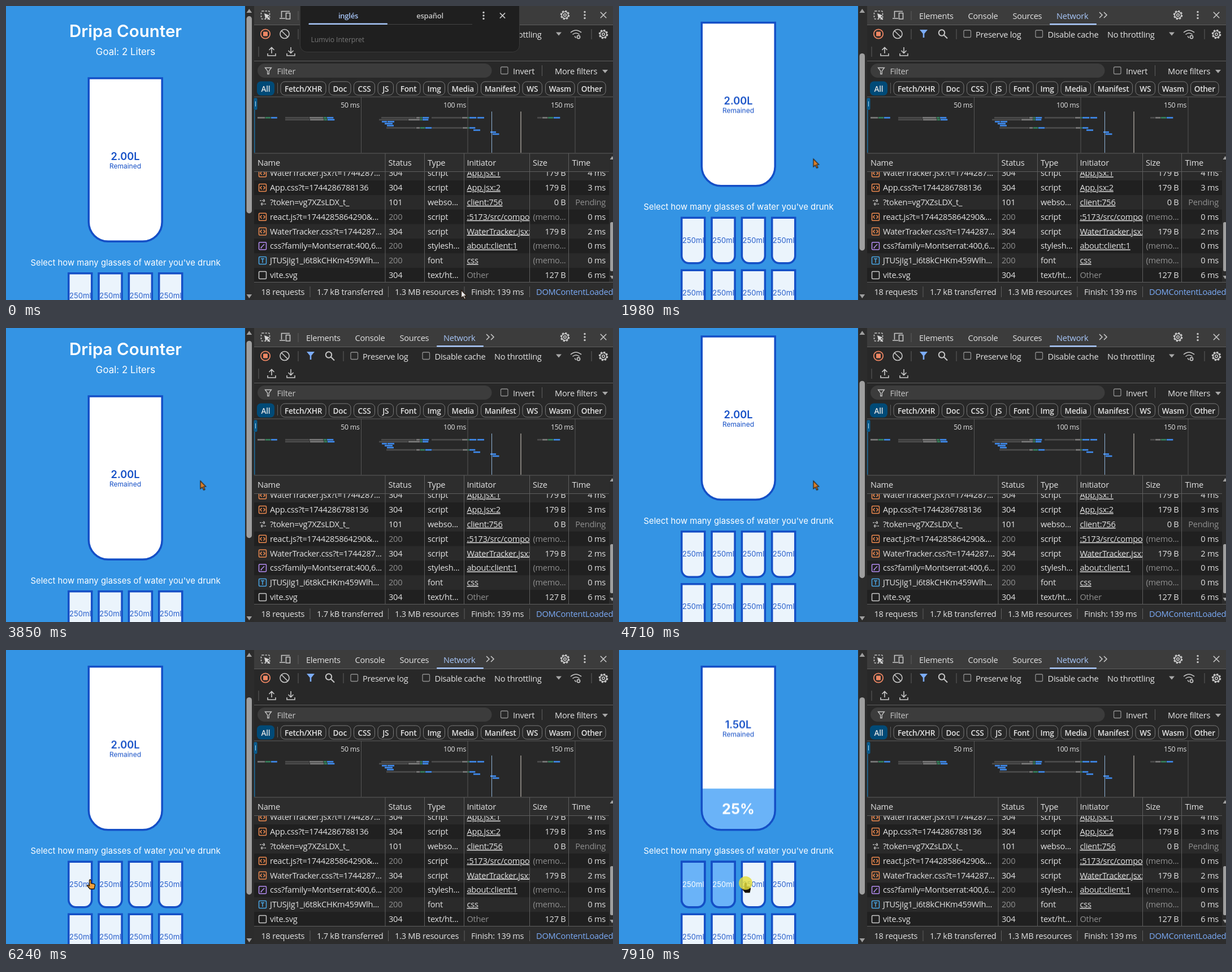
Animation, 1074 px wide and 521 px high, one loop 8 s. Source, as an HTML page:

```html
<!DOCTYPE html>
<html lang="en">
<head>
<meta charset="utf-8">
<title>Hydration page</title>
<style>
@property --scroll { syntax: "<number>"; inherits: true; initial-value: 0; }
@property --level { syntax: "<number>"; inherits: true; initial-value: 0; }
html, body { margin: 0; width: 100%; height: 100%; overflow: hidden; background: #282828; }
svg { display: block; width: 1074px; height: 521px;
  animation: scroll 8s step-end infinite, level 8s linear infinite; }
text { font: 14.6px "Open Sans", "Noto Sans", sans-serif; letter-spacing: -.25px; fill: #e3e3e3; white-space: pre; }
.app text { font-family: Inter, sans-serif; letter-spacing: 0; text-anchor: middle; fill: #fff; }
.app .ink { fill: #144fc6; }
.app .soft { fill: #2a61cc; }
.dim { fill: #8f8f8f; }
.link { text-decoration: underline; }
.blue { fill: #a8c7fa; }
.end { text-anchor: end; }
.mid { text-anchor: middle; }
.line { fill: none; stroke: #c7c7c7; stroke-width: 1.6; }
.glass { stroke: #144fc6; stroke-width: 3.5; }

.page { transform: translateY(calc(var(--scroll) * -1px)); }
.thumb { transform: translateY(calc(var(--scroll) * .67px)); }
.liquid { transform: translateY(calc(var(--level) * -2.86px)); }
.half { transform: translateY(calc(var(--level) * -1.43px)); }
.p0, .p1, .p2, .hover, .click, .arrow, .hand { animation: p0 8s step-end infinite; }
.p1 { animation-name: p1; }
.p2 { animation-name: p2; }
.hover { animation-name: hover; }
.click { animation-name: click; }
.arrow { animation-name: arrow; }
.hand { animation-name: hand; }
.full0 { animation: full0 8s linear infinite; }
.full1 { animation: full1 8s linear infinite; }
.popup { animation: popup 8s linear infinite; }
.pointer { animation: pointer 8s linear infinite; }

@keyframes scroll {
  0%, 35.45%, 66.2% { --scroll: 0; }
  22.2%, 48.1%, 69.45% { --scroll: 7; }
  23.05%, 48.9%, 70.25% { --scroll: 44; }
  23.85%, 49.7%, 71.1% { --scroll: 87; }
  24.7%, 50.55%, 71.9%, 100% { --scroll: 98.5; }
  33.8% { --scroll: 65; }
  34.6% { --scroll: 12; }
  58.8% { --scroll: 113; }
  59.6% { --scroll: 150; }
  60.4% { --scroll: 187; }
  61.2% { --scroll: 197; }
  62.1% { --scroll: 165; }
  62.9% { --scroll: 112; }
  63.7% { --scroll: 78; }
  64.5% { --scroll: 40; }
  65.3% { --scroll: 10; }
}
@keyframes level {
  0%, 80.4% { --level: 0; animation-timing-function: ease; }
  84.2% { --level: 12.5; }
  90.55% { --level: 12.5; animation-timing-function: ease; }
  94.3%, 100% { --level: 25; }
}
@keyframes p0 { 0% { opacity: 1; } 80.4%, 100% { opacity: 0; } }
@keyframes p1 { 0%, 90.55%, 100% { opacity: 0; } 80.4% { opacity: 1; } }
@keyframes p2 { 0% { opacity: 0; } 90.55%, 100% { opacity: 1; } }
@keyframes full0 { 0%, 80.4% { opacity: 0; } 84.2%, 100% { opacity: 1; } }
@keyframes full1 { 0%, 90.55% { opacity: 0; } 94.3%, 100% { opacity: 1; } }
@keyframes popup { 0%, 7.4% { opacity: 1; } 10%, 100% { opacity: 0; } }
@keyframes hover {
  0%, 2.45%, 100% { opacity: 0; }
  .85% { opacity: 1; transform: translateY(103.2px); }
  1.65% { opacity: 1; transform: none; }
}
@keyframes click {
  0%, 9.1%, 83%, 93.1% { opacity: 0; }
  7.4%, 80.4%, 90.55%, 98.8%, 100% { opacity: .82; }
}
@keyframes arrow {
  0% { fill: #e6e6e6; opacity: 1; }
  2.8% { fill: #d9802c; opacity: 1; }
  77.5%, 100% { fill: #d9802c; opacity: 0; }
}
@keyframes hand {
  0% { fill: #f0a03c; opacity: 0; }
  77.5% { fill: #f0a03c; opacity: 1; }
  98.8%, 100% { fill: #141008; opacity: 1; }
}
@keyframes pointer {
  0%, .8% { transform: translate(805px, 503px); }
  1.7% { transform: translate(640px, 380px); }
  2.5% { transform: translate(470px, 240px); }
  3.3% { transform: translate(335px, 222px); }
  4.1%, 8.8% { transform: translate(258px, 303px); }
  14%, 72% { transform: translate(343.5px, 270.5px); }
  75% { transform: translate(268px, 306px); }
  77.9%, 84.75% { transform: translate(149px, 407px); }
  89.7%, 92.5% { transform: translate(188px, 412px); }
  95.6%, 100% { transform: translate(224px, 413px); }
}
</style>
</head>
<body>
<script>
const text = (x, y, s, cls = "", style = "") =>
  `<text x="${x}" y="${y}" class="${cls}" style="${style}">${s}</text>`;
const box = (x, y, w, h, fill, r = 0, more = "") =>
  `<rect x="${x}" y="${y}" width="${w}" height="${h}" rx="${r}" fill="${fill}" ${more}/>`;
const path = (d, more = 'class="line"') => `<path d="${d}" ${more}/>`;
const solid = (d, fill = "#c7c7c7") => path(d, `fill="${fill}"`);
const vline = (x, y, h, c = "#5e5e5e") => box(x - .5, y, 1, h, c);
const hline = (y) => box(439, y, 635, 1, "#5e5e5e");
const list = (items, fn) => items.map(fn).join("");

// ---- water page ----
const cupPath = (x, y, w, h, r) =>
  `M${x} ${y}h${w}v${h - r}a${r} ${r} 0 0 1 ${-r} ${r}h${2 * r - w}a${r} ${r} 0 0 1 ${-r} ${-r}z`;

function cup(i) {
  const x = 110.8 + (i % 4) * 53.3, y = 473.8 + (i >> 2) * 93;
  const d = cupPath(x, y, 41, 80.4, 13);
  const label = (cls) => text(x + 20.5, y + 44.2, "250ml", cls, "font-size:13.1px");
  const full = i < 2 ? `<g class="full${i}">${path(d, 'class="glass" fill="#6ab3f8"')}${label("")}</g>` : "";
  return path(d, 'class="glass" fill="#ebf4fc"') + label("soft") + full;
}

const big = cupPath(146.3, 127.9, 129.9, 289.4, 34.5);
const page = `<g class="page">
  ${text(211.5, 54.5, "Dripa Counter", "", "font-size:29.5px;font-weight:600")}
  ${text(211.5, 87, "Goal: 2 Liters", "", "font-size:16.9px")}
  ${path(big, 'fill="#fff"')}
  <g clip-path="url(#inner)">
    <g class="liquid">${box(146, 415.6, 131, 80, "#6ab3f8")}</g>
    <g class="half">
      ${list(["2.00L", "1.75L", "1.50L"], (s, i) =>
        text(211, 272.5, s, "ink p" + i, "font-size:18.2px;font-weight:600"))}
      ${text(211, 287.5, "Remained", "ink", "font-size:12px")}
      ${list(["", "12.5%", "25%"], (s, i) =>
        text(211, 425, s, "p" + i, "font-size:25.5px;font-weight:700"))}
    </g>
  </g>
  ${path(big, 'class="glass" fill="none"')}
  ${text(211.5, 459.5, "Select how many glasses of water you've drunk", "", "font-size:14.9px")}
  ${list([...Array(8).keys()], cup)}
</g>`;

const pageBar = box(423, 0, 16, 521, "#2c2c2c")
  + solid("M425.5 12l4.8-7 4.8 7z", "#9f9f9f") + solid("M425.5 511l4.8 7 4.8-7z", "#9f9f9f")
  + `<g class="thumb">${box(425.5, 18, 9.5, 349.5, "#9f9f9f", 4.7)}</g>`;

// ---- icons ----
const at = (x, y, s) => `<g transform="translate(${x} ${y})">${s}</g>`;
const gear = (x, y) => at(x, y, `<circle r="6.8" class="line" stroke-dasharray="3.1 2.24" style="stroke-width:3"/>
  <circle r="5.8" class="line"/><circle r="2.3" class="line"/>`);
const dots = (x, y) => list([-5.5, 0, 5.5], (d) => `<circle cx="${x}" cy="${y + d}" r="1.7" fill="#c7c7c7"/>`);
const cross = (x, y, r) => path(`M${x - r} ${y - r}l${2 * r} ${2 * r}m0 ${-2 * r}l${-2 * r} ${2 * r}`);
const check = (x, y) => box(x, y, 12.5, 12.5, "none", 2, 'stroke="#8f8f8f" stroke-width="1.3"');
const caret = (x, y) => solid(`M${x - 5} ${y - 3}h10l-5 6z`, "#a8a8a8");
const funnel = (x, y, k, attrs) =>
  path(`M${x - k} ${y - k}h${2 * k}l${1.3 - k} ${k}v${k}h-2.6v${-k}z`, attrs);

// ---- developer panel ----
const toolbars = box(439, 0, 635, 521, "#282828") + box(439, 0, 635, 33, "#3c3c3c") + hline(33)
  + box(451.5, 9, 15, 14, "none", 2, 'class="line" stroke-dasharray="3 2.2"')
  + solid("M457 13l10 4-4 1.6 4.5 4.6-1.6 1.6-4.6-4.6-1.8 4z", "#d8d8d8")
  + path("M502 9.5h-14.5v11M484 22h10M495.5 12.5h7v10.5h-7z") + vline(517, 9, 16)
  + list([["Elements", 531], ["Console", 617.5], ["Sources", 696.5]], ([s, x]) => text(x, 23, s))
  + text(774, 23, "Network", "blue") + box(762, 31, 83, 2.5, "#a8c7fa", 1)
  + path("M850 11l5 5-5 5m8-10l5 5-5 5") + gear(989, 16) + dots(1024, 16) + cross(1057, 16, 5.2)
  + `<circle cx="459" cy="49.5" r="8.2" fill="none" stroke="#ec8663" stroke-width="1.8"/>`
  + box(455, 45.5, 8, 8, "#ec8663", 1)
  + `<circle cx="493" cy="49.5" r="8" class="line"/>` + path("M487.5 44l11 11") + vline(517, 41, 18)
  + funnel(539, 49, 7, 'fill="#7cacf8"')
  + `<circle cx="571" cy="47.5" r="5.2" class="line" style="stroke-width:2"/>`
  + path("M575 51.5l6 6", 'class="line" style="stroke-width:2"') + vline(597, 41, 18)
  + check(610, 43) + text(631, 55.5, "Preserve log") + check(737, 43) + text(758.5, 55.5, "Disable cache")
  + text(864, 55.5, "No throttling") + caret(978, 49.5)
  + path("M999 47q9.500-8 19 0M1002.500 50.500q6-5 12 0M1006 53.500l2.500 3")
  + at(1013, 55, `<circle r="2.600" class="line"/>`) + vline(1036, 41, 18) + gear(1057, 50)
  + vline(447, 72, 18)
  + path("M470 84v-10m-4.500 4l4.500-4.500 4.500 4.500M463 84v4h14v-4M504 73v10m-4.500-4l4.500 4.500 4.500-4.500M497 84v4h14v-4")
  + hline(97)
  + box(445, 102, 414.5, 25, "#3c3c3c", 12.5) + funnel(464, 115, 5.5, 'class="line" style="stroke-width:1.3"')
  + text(479.5, 120.5, "Filter", "", "fill:#c7c7c7") + check(875.5, 108) + text(897, 120.5, "Invert")
  + vline(948.5, 105, 19) + text(971, 120.5, "More filters") + caret(1060, 116);

const pills = { "Fetch/XHR": [486, 566], Doc: [571.5, 610], CSS: [615.5, 652.5], JS: [658, 685.5], Font: [691, 733],
  Img: [738.5, 776.5], Media: [782, 834.5], Manifest: [840.5, 908.5], WS: [914, 948.5], Wasm: [954.5, 1006], Other: [1011.5, 1061] };
const pillText = (x, s) => text(x, 151.5, s, "mid", "font-size:13.6px;font-weight:600");
const filters = box(444, 133.5, 31, 25, "#004a77", 7) + pillText(459.5, "All") + vline(480.5, 136, 19)
  + list(Object.entries(pills), ([s, [a, b]]) =>
    box(a, 134, b - a, 24, "none", 7.5, 'stroke="#7a7a7a"') + pillText((a + b) / 2, s));

// Each strip lists its edges: waiting, queued, server, download.
const shades = ["#4c4c4c", "#7d7d7d", "#35845c", "#3f8cf0"];
const strip = ([y, ...x]) => list(shades, (c, i) => box(x[i], y - 1.3, Math.max(0, x[i + 1] - x[i] - .7), 2.6, c));
const dash = ([y, x, w]) => box(x, y - 1.3, w, 2.6, shades[3]);
const overview = hline(160.5)
  + list([[628.5, "50 ms"], [817, "100 ms"], [1007, "150 ms"]], ([x, s]) =>
    vline(x, 161, 99, "#555") + text(x - 3, 179.5, s, "end", "font-size:12.3px"))
  + list([[198, 445, 445, 459, 469, 480.5], [198, 494, 537, 562, 568, 580], [198, 664, 726, 733, 737, 749],
    [198, 753, 807, 817, 820, 833], [198, 940, 949, 959, 969, 981], [201.5, 494, 538, 563, 569, 582],
    [201.5, 660, 712, 733, 737, 748], [216, 673, 726, 733, 742, 754], [216, 754, 808, 817, 820, 831]], strip)
  + list([[198, 834, 12], [205, 665, 9], [205, 675, 12], [208.5, 670, 14], [212, 674, 12], [220, 827, 12],
    [223.5, 857, 10], [227, 861, 11.500]], dash)
  + vline(859.5, 187, 73, "#8fb4d8") + vline(911, 187, 73, "#d8d0c8")
  + box(439, 184, 1.5, 76, "#1f6f9f") + box(438.500, 163, 6, 21, "#0b5b8c", 2) + vline(441.5, 169, 9, "#a8d4f0");

const glyphs = {
  code: ["#ee8a4f", "M452.500-3l-2.600 3 2.600 3m3-6l2.600 3-2.600 3"],
  style: ["#b48cf2", "M451 3l6-6M450.500 4l2-1"],
  font: ["#4aa8e8", "M451-3h6m-3 0v7"],
  page: ["#c7c7c7", ""],
};
const icon = (kind) => kind === "socket"
  ? path("M449-3h9m-2.500-2.500l2.500 2.500-2.500 2.500M460 3h-9m2.500-2.500l-2.500 2.500 2.500 2.500", 'class="line" stroke-dasharray="3 1" style="stroke-width:1.4"')
  : `<g fill="none" stroke="${glyphs[kind][0]}" stroke-width="1.5">${box(447.5, -6.5, 13, 13, "none", 1.5)}${path(glyphs[kind][1], "")}</g>`;

const rows = [
  ["code", "WaterTracker.jsx?t=1744287...", 304, "script", "App.jsx:1", "179 B", "4 ms"],
  ["code", "App.css?t=1744286788136", 304, "script", "App.jsx:2", "179 B", "3 ms"],
  ["socket", "?token=vg7XZsLDX_t_", 101, "webso...", "client:756", "0 B", "Pending"],
  ["code", "react.js?t=1744285864290&amp;...", 200, "script", ":5173/src/compo", "(memo...", "0 ms"],
  ["code", "WaterTracker.css?t=1744287...", 304, "script", "WaterTracker.jsx:2", "179 B", "2 ms"],
  ["style", "css?family=Montserrat:400,6...", 200, "stylesh...", "about:client:1", "(memo...", "0 ms"],
  ["font", "JTUSjIg1_i6t8kCHKm459Wlh...", 200, "font", "css", "(memo...", "0 ms"],
  ["page", "vite.svg", 304, "text/ht...", "Other", "127 B", "6 ms"],
];
const dimIf = (on) => on ? "dim" : "";
const row = ([kind, name, status, type, from, size, time], i) => at(0, 296.3 + i * 25.8,
  box(439, -12.9, 628, 25.8, i % 2 ? "#202020" : "#2a2a2a") + icon(kind)
  + text(467, 5, name) + text(677, 5, status, dimIf(status === 200)) + text(746, 5, type)
  + `<g clip-path="url(#from)">${text(815.5, 5, from, from === "Other" ? "dim" : "link")}</g>`
  + text(990.5, 5, size, "end " + dimIf(size[0] === "("))
  + text(1061, 5, time, "end " + dimIf(time === "Pending")));

const table = `<g clip-path="url(#body)">${list(rows, row)}
    <g class="hover">${box(439, 361, 628, 25.8, "#fff", 0, 'opacity=".1"')}</g></g>`
  + box(439, 261, 635, 32.500, "#2d2d2d") + hline(260.5) + hline(293)
  + list([["Name", 445], ["Status", 676.5], ["Type", 746], ["Initiator", 815.5], ["Size", 932], ["Time", 1001.500]],
    ([s, x]) => text(x, 283.3, s))
  + list([671, 740.5, 810.5, 926.5, 995.5], (x) => vline(x, 261, 228))
  + box(1067, 262, 7, 227, "#2c2c2c") + box(1069, 383, 6, 87, "#9f9f9f", 2.5)
  + solid("M1068.500 272l4-6 4 6z", "#9f9f9f") + solid("M1068.500 478l4 6 4-6z", "#9f9f9f")
  + box(439, 489, 635, 32, "#2d2d2d") + hline(489)
  + list([["18 requests", 451.5], ["1.7 kB transferred", 550], ["1.3 MB resources", 688], ["Finish: 139 ms", 823]],
    ([s, x]) => text(x, 512.3, s))
  + list([538, 676.5, 811, 926.5], (x) => vline(x, 497, 19))
  + text(938, 512.3, "DOMContentLoaded", "", "fill:#7cacf8");

const popup = `<g class="popup">
  ${box(520.5, -14, 388, 95.5, "#1f1f1f", 12, 'stroke="#3a3a3a"')}
  ${text(605.5, 22, "inglés", "mid blue", "font-size:13px;font-weight:600")}
  ${text(750, 22, "español", "mid", "font-size:13px;font-weight:600;fill:#c7c7c7")}
  ${box(535, 32, 290, 1, "#444")}${box(535.5, 30.5, 139.5, 2.5, "#a8c7fa", 1)}
  ${dots(845, 17)}${cross(878.5, 17, 4.6)}
  ${text(539.5, 64, "Lumvio Interpret", "", "font-size:12.3px;letter-spacing:-.1px;fill:#777")}
</g>`;

const pointer = `<g class="pointer">
  ${path("M.5.5v14l3.300-2.900 2.500 5 2.200-1-2.400-4.900 4-.2z", 'class="arrow" stroke="#2a1c10" stroke-width="1.2"')}
  ${path("M-1.500 1q1.500-2 3 0v5.500l5.500 1.200q1.800.600 1.500 2.500l-1.500 6.300h-7.500l-5-6q.5-2 4 .5z", 'class="hand" stroke="#1c1409" stroke-width="1.3"')}
  <circle class="click" r="12" fill="#e4de3c"/>
</g>`;

document.body.innerHTML = `<svg viewBox="0 0 1074 521">
  <defs>
    <clipPath id="inner">${path(big, "")}</clipPath>
    <clipPath id="app">${box(0, 0, 423, 521, "#000")}</clipPath>
    <clipPath id="body">${box(439, 293, 635, 196, "#000")}</clipPath>
    <clipPath id="from">${box(811, -13, 115, 26, "#000")}</clipPath>
  </defs>
  <g class="app" clip-path="url(#app)">${box(0, 0, 423, 521, "#3494e4")}${page}</g>
  ${pageBar}${toolbars}${filters}${overview}${table}${popup}${pointer}
</svg>`;
</script>
</body>
</html>
```
